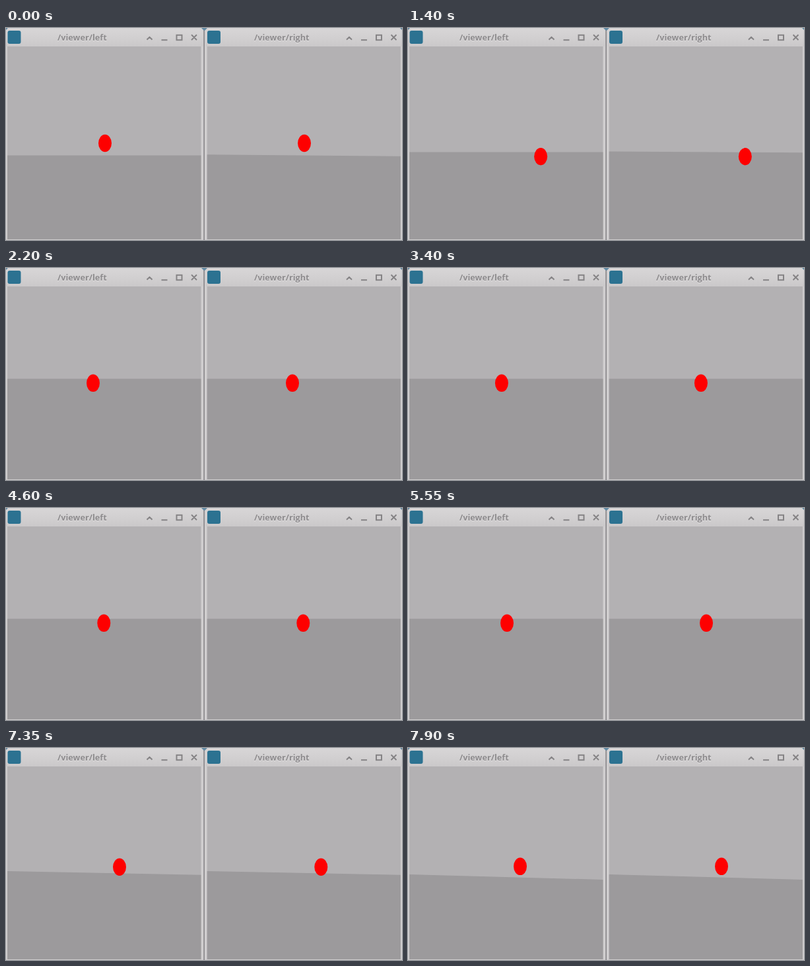
An HTML page that plays this animation: 600 px wide and 322 px high, repeating every 8000 ms.

```html
<!DOCTYPE html>
<html lang="en">
<head>
<meta charset="utf-8">
<title>Stereo viewer</title>
<style>
html, body { margin: 0; width: 100%; height: 100%; overflow: hidden; background: #d0cecf; }
svg { display: block; }
text { font: bold 12.7px "Open Sans", "Noto Sans", sans-serif; }
.glyph { fill: none; stroke: #858385; stroke-width: 2; }
</style>
</head>
<body>
<svg id="stage" width="600" height="322" viewBox="0 0 600 322">
  <defs>
    <linearGradient id="bar" x1="0" y1="0" x2="0" y2="1">
      <stop offset="0" stop-color="#d8d6d7"/>
      <stop offset="1" stop-color="#cbc9ca"/>
    </linearGradient>
  </defs>
  <rect width="600" height="322" fill="#d0cecf"/>
</svg>
<script>
const stage = document.getElementById('stage');
const LOOP = 8000, STEP = 50, LAST = 7900;
const SPACING = 302; // distance between matching points of the two views

function add(tag, attrs) {
  const el = document.createElementNS('http://www.w3.org/2000/svg', tag);
  for (const name in attrs) el.setAttribute(name, attrs[name]);
  return stage.appendChild(el);
}

function makeView(x, width, title, titleX, iconX, buttonX) {
  add('rect', { x: x - 2, y: 0, width: width + 5, height: 28, fill: 'url(#bar)' });
  add('rect', { x: iconX, y: 4, width: 20, height: 20, rx: 3, fill: '#2c7291' });

  for (const [shift, fill] of [[1, '#e6e4e5'], [0, '#8d8b8d']]) {
    add('text', { x: titleX, y: 18.8 + shift, fill }).textContent = title;
  }
  add('path', {
    class: 'glyph',
    transform: `translate(${buttonX} 0.3)`,
    d: 'M-4 17.5L0 13.5L4 17.5M18 18H27M41 10.5H49V18H41ZM63.5 10L71.5 18M71.5 10L63.5 18'
  });

  add('rect', { x, y: 28, width, height: 293, fill: '#b3b1b3' });
  const ground = add('path', { fill: '#9c9a9c' });
  const ball = add('ellipse', { rx: 10, ry: 13.2, fill: '#fe0000' });

  return (ballX, ballY, horizon, tilt) => {
    const y1 = horizon - tilt / 2, y2 = horizon + tilt / 2;
    ground.setAttribute('d', `M${x} ${y1}L${x + width} ${y2}V321H${x}Z`);
    ball.setAttribute('cx', ballX);
    ball.setAttribute('cy', ballY);
  };
}

const drawLeft = makeView(2, 293.5, '/viewer/left', 78, 2.5, 217.5);
const drawRight = makeView(304.7, 293.3, '/viewer/right', 376, 305, 520);

// Seam between the two windows, with the desktop showing at the corners
add('rect', { x: 299.3, y: 0, width: 1.7, height: 322, fill: '#8b898c' });
add('path', { d: 'M296 0H305L301 4H300ZM0 0H3L0 3ZM600 0H597L600 3Z', fill: '#648ba4' });

function draw(now) {
  const t = Math.min(LAST, Math.floor((now % LOOP) / STEP) * STEP);
  const ramp = (from, to, power = 1) =>
    Math.min(1, Math.max(0, (t - from) / (to - from))) ** power;

  // The ball moves off, the cameras chase it, overshoot and settle; then again
  const move = ramp(300, 1050), settle = ramp(1850, 2200);
  const drift = 1 - (1 - ramp(2200, 5400)) ** 1.7;
  const again = ramp(6800, 7550), back = ramp(7550, 7900);

  const shift = 61 * move - 79 * ramp(1150, 2200, 1.45) + 18 * drift + 30 * again - 10 * back;
  const ballY = 175 + 30.5 * move - 41 * ramp(1150, 1850, 1.35) + 10.3 * settle
    + 11 * again ** 2 - 6 * back;
  const horizon = 193.5 - 36 * ramp(1150, 1850, 1.9) + 10.7 * settle
    + 34.5 * again ** 1.5 - 6.7 * back;

  const roll = 8 * again;
  const rightRoll = roll + 2.5 * (1 - ramp(1150, 1850));
  const parallax = 0.15 * Math.max(0, shift);

  drawLeft(150 + shift, ballY, horizon, roll);
  drawRight(150 + SPACING + shift + parallax, ballY, horizon, rightRoll);
}

const start = performance.now();
function tick() {
  draw(performance.now() - start);
  requestAnimationFrame(tick);
}
tick();
</script>
</body>
</html>
```
